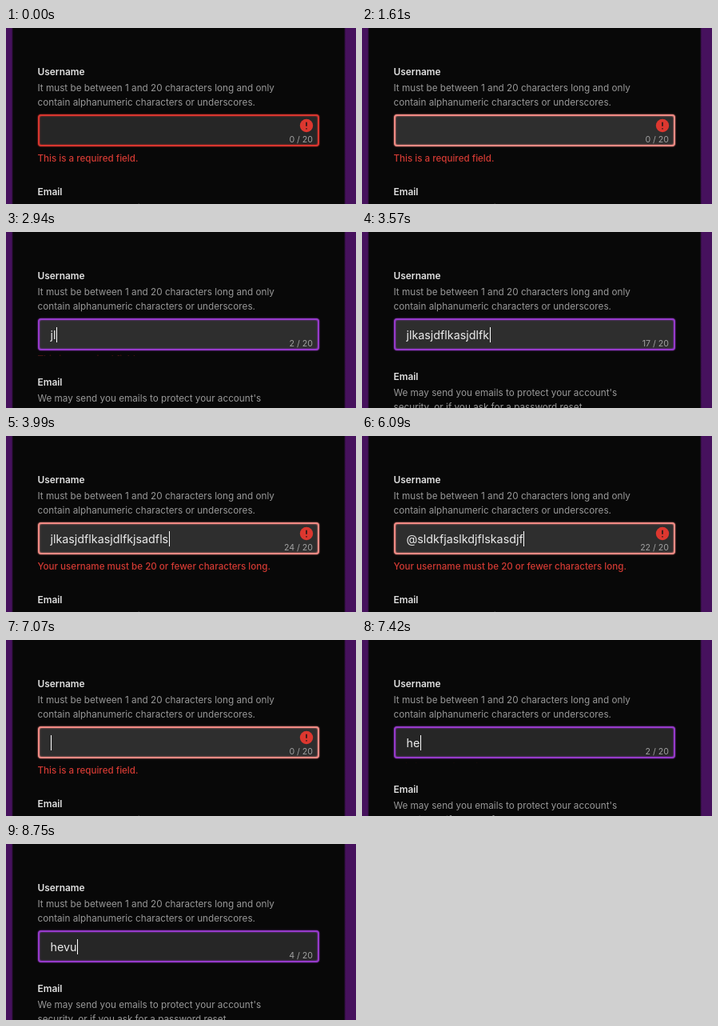
These frames come from a looping animation (438 px wide and 220 px high, 9.03 s). An HTML page:

```html
<!DOCTYPE html>
<html lang="en">
<head>
<meta charset="utf-8">
<title>Username field validation</title>
<style>
  html, body { margin: 0; width: 100%; height: 100%; overflow: hidden; }
  body { position: relative; font: 400 11.72px/18px Inter, "Open Sans", sans-serif; color: #999;
    background: linear-gradient(90deg, #46115d 7px, #080808 9px, #080808 423px, #46115d 425px); }
  .panel { position: absolute; left: 8px; top: 0; width: 416px; height: 220px; overflow: hidden; }
  .panel > * { position: absolute; left: 31.5px; white-space: pre; }
  h2 { margin: 0 0 2px; font: 600 11.9px/18px Inter, "Open Sans", sans-serif; color: #e2e2e2; }
  p { margin: 0; }
  #user { top: 46px; }
  #field { left: 32px; top: 108px; width: 352px; height: 40px; box-sizing: border-box;
    border: 2px solid; border-radius: 4px; box-shadow: 0 0 2px, inset 0 0 2px; }
  #entry { left: 47.5px; top: 119px; height: 19px; font-size: 14.3px; line-height: 19px; color: #ebebeb; }
  #entry > * { display: inline-block; height: 19px; vertical-align: top; }
  #typed.selected { background: #3b5a80; }
  #caret { width: 1px; margin-left: .5px; background: #fff; }
  #counter { left: auto; right: 40px; top: 131px; font-size: 10.6px; color: #a2a2a2; }
  #icon { left: 359px; top: 113px; }
  #error { top: 148px; font-size: 11.6px; font-weight: 500; color: #d23a33; overflow: hidden; }
</style>
</head>
<body>
<div class="panel">
  <div id="user"><h2>Username</h2><p>It must be between 1 and 20 characters long and only
contain alphanumeric characters or underscores.</p></div>
  <div id="field"></div>
  <div id="entry"><span id="typed"></span><span id="caret"></span></div>
  <div id="counter"></div>
  <svg id="icon" width="18" height="18">
    <circle cx="9" cy="9" r="8.2" fill="#dc372f"/>
    <path d="M9 4.8V9.8M9 12.2V13.4" stroke="#2b1a1a" stroke-width="1.7"/>
  </svg>
  <div id="error"></div>
  <div id="email"><h2>Email</h2><p>We may send you emails to protect your account's
security, or if you ask for a password reset.</p></div>
</div>
<script>
const LOOP = 9030, TICK = 70, LIMIT = 20, SLIDE = 280;
const $ = id => document.getElementById(id);
const [field, typed, caret, counter, icon, error, email] =
  ["field", "typed", "caret", "counter", "icon", "error", "email"].map($);

const REQUIRED = "This is a required field.";
const TOO_LONG = "Your username must be 20 or fewer characters long.";
const BAD_CHARS = "Your username must only contain alphanumeric\ncharacters or underscores.";

// Each entry: text and [time, characters typed]; steady typing between "run" points.
const entries = [
  { from: 0, text: "", keys: [[0, 0]] },
  { from: 2730, text: "jlkasjdflkasjdlfkjsadfls", keys: [[2730, 1], [2870, 2], [2940, 2, "run"], [3710, 21, "run"], [3850, 24]] },
  { from: 4550, text: "", keys: [[4550, 0]] },
  { from: 4900, text: "@sldkfjaslkdjflskasdjfl", keys: [[4900, 1], [5390, 3, "run"], [6090, 22], [6230, 23]] },
  { from: 7070, text: "", keys: [[7070, 0]] },
  { from: 7210, text: "hevu", keys: [[7210, 1], [7350, 2], [7490, 3], [7700, 4]] }
];
const selections = [[4410, 4550], [6650, 7070]];
const caretOff = [[0, 1050], [1610, 2100], [2660, 2730], [8190, 8750], ...selections];

const clamp = v => Math.min(1, Math.max(0, v));
const within = (spans, t) => spans.some(([a, b]) => t >= a && t < b);
const mix = (a, b, k) => `rgb(${a.map((v, i) => Math.round(v + (b[i] - v) * k))})`;

const RED = [216, 54, 47], PINK = [240, 138, 132], PURPLE = "#963aca";
const DARK = "#262626", LIGHT = "#2e2e2e";

function textAt(t) {
  const { text, keys } = entries.findLast(e => e.from <= t);
  const i = keys.findLastIndex(k => k[0] <= t);
  const [at, count, run] = keys[i];
  if (!run) return text.slice(0, count);
  const [end, last] = keys[i + 1];
  return text.slice(0, count + Math.floor((last - count) * (t - at) / (end - at)));
}

function problem(text) {
  if (!text) return REQUIRED;
  if (text.length > LIMIT) return TOO_LONG;
  return /\W/.test(text) ? BAD_CHARS : "";
}

// How far the message is unfolded, 0 to 1.
function openness(t) {
  if (t < 3710) return 1 - clamp((t - 2740) / SLIDE);
  if (t < 7210) return clamp((t - 3710) / SLIDE);
  return 1 - clamp((t - 7210) / SLIDE);
}

function draw(t) {
  const text = textAt(t), message = problem(text), open = openness(t);
  const twoLines = message === BAD_CHARS;

  typed.textContent = text;
  typed.className = within(selections, t) ? "selected" : "";
  caret.style.visibility = within(caretOff, t) ? "hidden" : "visible";
  counter.textContent = `${text.length} / ${LIMIT}`;
  icon.style.visibility = message ? "visible" : "hidden";

  field.style.color = message ? mix(RED, PINK, clamp((t - 910) / 140)) : PURPLE;
  field.style.background = t >= 840 && t < 7210 ? LIGHT : DARK;

  error.textContent = message || REQUIRED;
  error.style.height = (twoLines ? 36 : 18) * open + "px";
  error.style.paddingTop = 6 * open + "px";
  error.style.opacity = open;
  email.style.top = 172 + (twoLines ? 38 : 24 * open) + "px";
}

function frame() {
  const t = performance.now() % LOOP;
  draw(Math.floor((t + 0.5) / TICK) * TICK % LOOP);
  requestAnimationFrame(frame);
}
frame();
</script>
</body>
</html>
```
